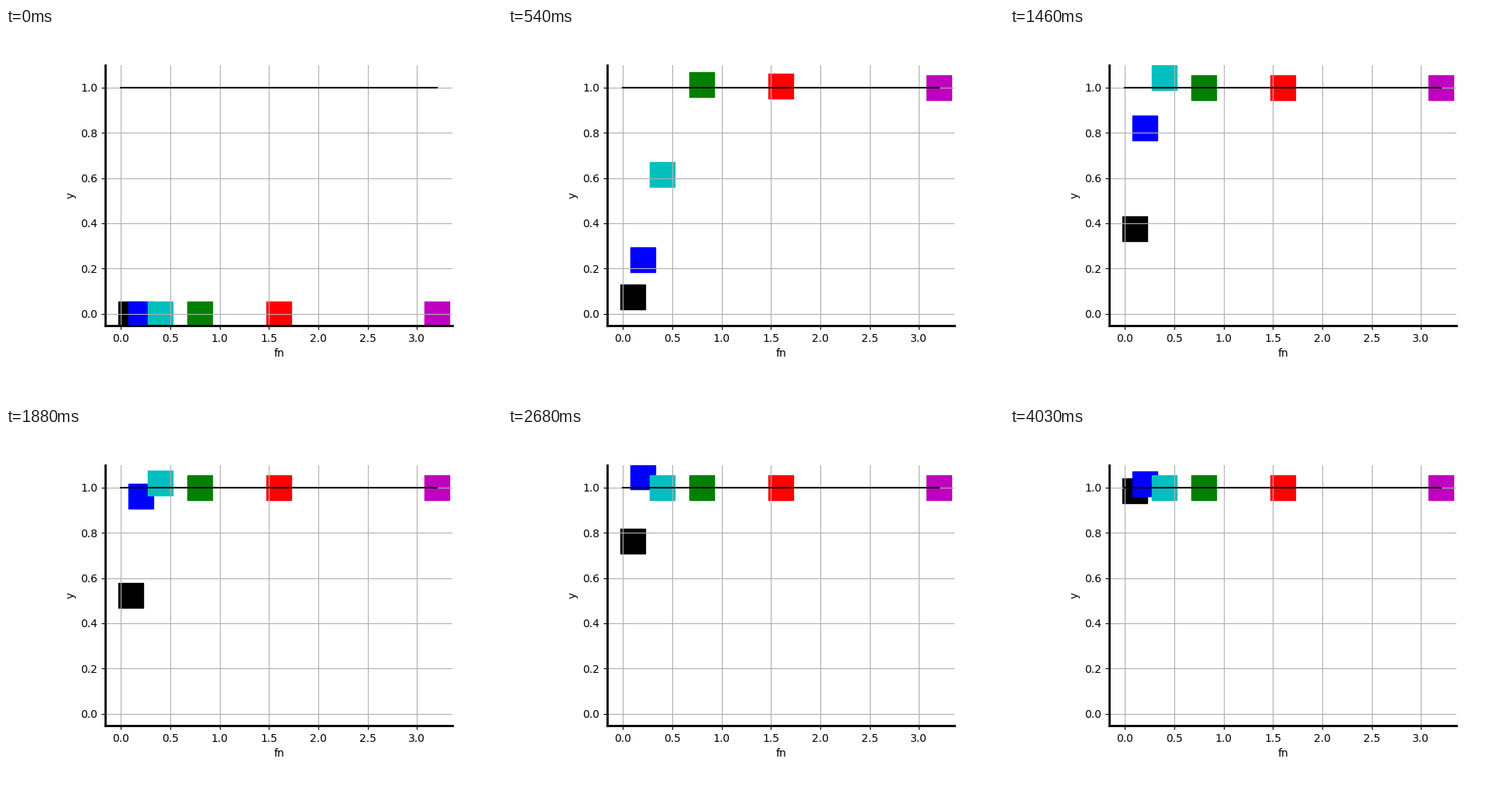
These frames come from a looping animation (640x480 px, 4050 ms). A matplotlib script:

```python
import numpy as np
import matplotlib.pyplot as plt
from matplotlib.animation import FuncAnimation

LOOP_MS, INTERVAL, SAMPLES = 4050, 18, 200
ZETA = 0.7
FN = np.array([0.1, 0.2, 0.4, 0.8, 1.6, 3.2])
COLORS = "kbcgrm"


def step_response(fn, t):
    """Unit step response of an underdamped second-order system."""
    root = np.sqrt(1 - ZETA**2)
    wt = 2 * np.pi * fn * t
    ring = np.cos(root * wt) + ZETA / root * np.sin(root * wt)
    return 1 - np.exp(-ZETA * wt) * ring


time = np.linspace(0, 5, SAMPLES)
y = step_response(FN, time[:, None])

plt.rcParams["font.family"] = "DejaVu Sans"
fig, ax = plt.subplots(figsize=(6.4, 4.8), dpi=100)
fig.subplots_adjust(left=0.2, right=0.9, bottom=0.2, top=0.9)

ax.plot([0, FN[-1]], [1, 1], "k", lw=1.5)
blocks = [ax.scatter(f, 0, s=500, marker="s", c=c) for f, c in zip(FN, COLORS)]

ax.set_xlim(-0.05 * FN[-1], 1.05 * FN[-1])
ax.set_ylim(-0.05 * y.max(), 1.05 * y.max())
ax.set_xlabel("fn")
ax.set_ylabel("y")
ax.grid(True)
for side in ("top", "right"):
    ax.spines[side].set_visible(False)
for side in ("left", "bottom"):
    ax.spines[side].set_linewidth(2)


def update(k):
    # 20 ms per sample, slowing slightly as the blocks settle
    ms = k * INTERVAL + INTERVAL - 1
    i = int(np.interp(ms, [0, 3740, 4030], [0, 187, SAMPLES - 1]))
    for block, f, level in zip(blocks, FN, y[i]):
        block.set_offsets([[f, level]])
    return blocks


anim = FuncAnimation(fig, update, frames=LOOP_MS // INTERVAL,
                     interval=INTERVAL, repeat=True, repeat_delay=0)
plt.show()
```
